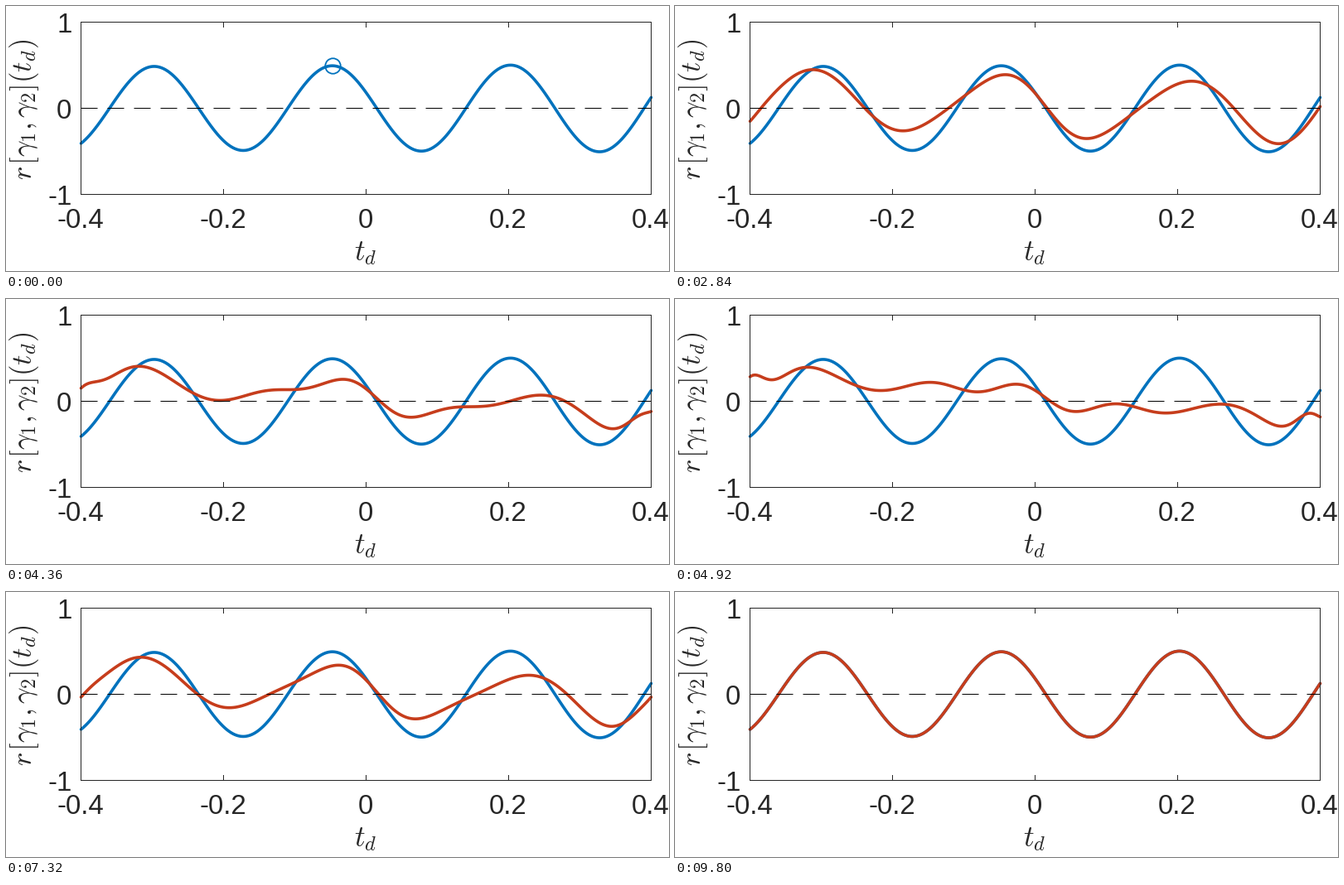
Recreate the animation shown at these times as a matplotlib script. Size 800x320 px, loop 9.84 s.

```python
import numpy as np
import matplotlib
import matplotlib.pyplot as plt
from matplotlib.animation import FuncAnimation

matplotlib.rcParams["mathtext.fontset"] = "cm"
matplotlib.rcParams["path.simplify"] = False

W, H, DPI = 800, 320, 100
LEFT, RIGHT, TOP, BOTTOM = 90, 778, 19, 227
MID = (TOP + BOTTOM) / 2
SPAN, PERIOD, LAG = 0.4, 0.25, -0.0475
INK, BLUE, RED = "#262626", "#0072bd", "#c63d1c"
FRAMES, STEP, INTRO, MORPH = 246, 40, 25, 98


def pt(px):
    return px * 72 / DPI


def to_px(t, r):
    """Data coordinates to stage pixels."""
    return LEFT + (t + SPAN) * (RIGHT - LEFT) / (2 * SPAN), MID - r * (BOTTOM - TOP) / 2


def correlation(t, p=0):
    """Cosine that fades, stretches, skews and tilts as p goes from 0 to 1."""
    stretch = 2.4 * p * t**3 * (1 - (t / SPAN)**4)
    theta = 2 * np.pi * (t - stretch - LAG) / PERIOD
    fade = 1 - 0.45 * p - 0.42 * p**2
    wave = (0.495 + 0.03 * t) * fade * np.cos(theta)
    skew = 0.07 * p * np.sin(2 * theta)
    tilt = (0.12 * p + 0.105 * p**2) * np.sin(4.5 * t)
    return wave + skew - tilt + 0.055 * p


fig = plt.figure(figsize=(W / DPI, H / DPI), dpi=DPI, facecolor="white")
ax = fig.add_axes([0, 0, 1, 1])
ax.set_xlim(-0.5, W - 0.5)
ax.set_ylim(H - 0.5, -0.5)
ax.axis("off")


def line(x, y, color=INK, width=1, **kw):
    return ax.plot(x, y, color=color, lw=pt(width), snap=False, **kw)[0]


def label(x, y, s, size, **kw):
    ax.text(x, y, s, fontsize=pt(size), color=INK, va="baseline",
            family="Liberation Sans", **kw)


# Axes box, ticks and labels
line([LEFT, RIGHT, RIGHT, LEFT, LEFT], [TOP, TOP, BOTTOM, BOTTOM, TOP], zorder=4)
for v in (-0.4, -0.2, 0, 0.2, 0.4):
    x = to_px(v, 0)[0]
    for edge, d in ((TOP, 6), (BOTTOM, -6)):
        line([x, x], [edge, edge + d], zorder=4)
    label(x - 0.5, 268, f"{v:g}", 33, ha="center")
for v in (-1, 0, 1):
    y = to_px(0, v)[1]
    for edge, d in ((LEFT, 6), (RIGHT, -6)):
        line([edge, edge + d], [y, y], zorder=4)
    label(79, y + 12, f"{v}", 33, ha="right")
label(433, 307, "$t_d$", 35, ha="center")
label(30, 124, r"$r\hspace{0.1}[\gamma_1,\gamma_2](t_d)$", 34.5, ha="center",
      rotation=90, rotation_mode="anchor")

# Curves
t = np.linspace(-SPAN, SPAN, 401)
line([LEFT, RIGHT], [MID, MID], "black", dashes=(20, 12), zorder=5)
line(*to_px(t, correlation(t)), BLUE, 3.6, solid_capstyle="round", zorder=2)
red = line(*to_px(t, correlation(t)), RED, 3.6, solid_capstyle="round", zorder=3)
cx, cy = to_px(LAG, correlation(LAG))
ring = line([cx], [cy], BLUE, marker="o", ms=pt(18.5), mfc="none",
            mew=pt(1.8), zorder=3)


def update(n):
    intro = n < INTRO
    ring.set_visible(intro)
    red.set_visible(not intro)
    p = np.clip(min(n - INTRO, FRAMES - 1 - n) / MORPH, 0, 1)
    red.set_ydata(to_px(t, correlation(t, p))[1])
    return red, ring


anim = FuncAnimation(fig, update, frames=FRAMES, interval=STEP,
                     init_func=lambda: update(0), repeat=True, repeat_delay=0)
plt.show()
```
